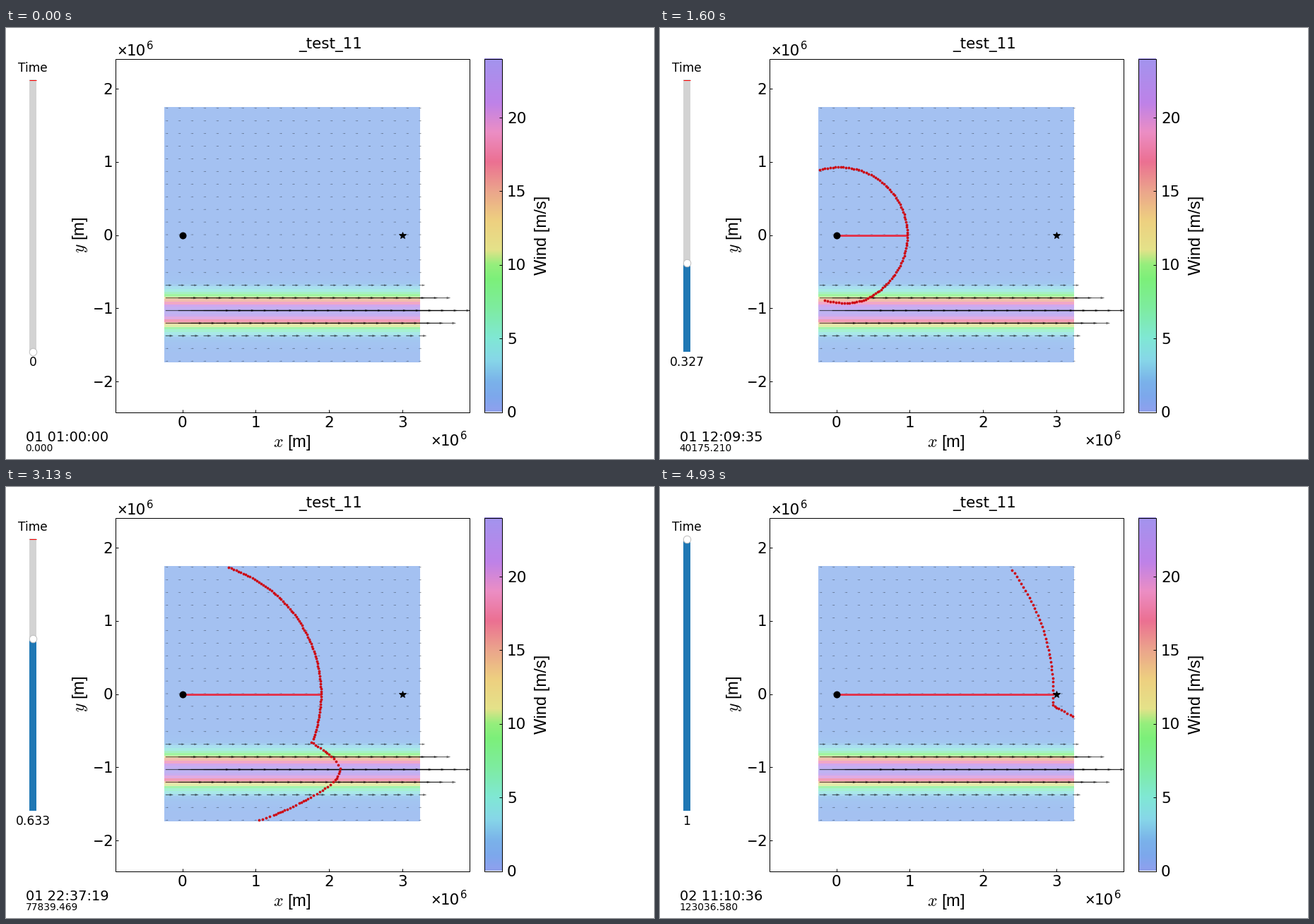
These frames come from a looping animation (917x611 px, 5060 ms). A matplotlib script:

```python
import math

import numpy as np
import matplotlib.pyplot as plt
from matplotlib.animation import FuncAnimation
from matplotlib.colors import LinearSegmentedColormap
from matplotlib.patches import Rectangle

plt.rcParams["mathtext.fontset"] = "cm"

WIDTH, HEIGHT, DPI = 917, 611, 64
PT = 72 / DPI                      # points per pixel
LOOP_MS, TICK_MS = 5060, 10
STEPS = 49

# Physics in units of 1e6 m and 1e6 s, so speeds stay in m/s
DURATION, SOLVER_STEP = 0.12303658, 0.00202
AIRSPEED, BASE_WIND, JET_WIND = 23.0, 1.0, 23.0
JET_Y, JET_SIGMA = -1.0417, 0.15
MAX_GAP = 0.06

# Pixel layout
ORIGIN_X, ORIGIN_Y, SCALE = 249.5, 293.5, 103.87
FIELD_LEFT, FIELD_TOP, FIELD_SIZE, CELLS = 224, 112, 362, 101
CELL = FIELD_SIZE / CELLS
LEFT, TOP, RIGHT, BOTTOM = 154.5, 43.5, 655.5, 544.5
BAR_LEFT, BAR_RIGHT, MAX_WIND = 676.5, 701.5, 24
TRACK_BOTTOM, TRACK_TOP = 458.5, 73.5


def to_px(x, y):
    return ORIGIN_X + SCALE * x, ORIGIN_Y - SCALE * y


def to_data(px, py):
    return (px - ORIGIN_X) / SCALE, (ORIGIN_Y - py) / SCALE


def cell_centers(start):
    return start + CELL * (np.arange(CELLS) + 0.5)


GRID_X, GRID_Y = cell_centers(FIELD_LEFT), cell_centers(FIELD_TOP)


def wind(y):
    return BASE_WIND + JET_WIND * np.exp(-((y - JET_Y) / JET_SIGMA) ** 2 / 2)


def flow(state):
    """Time-optimal rays (x, y, heading) in a wind that varies with y."""
    _, y, heading = state
    u = wind(y)
    shear = -(u - BASE_WIND) * (y - JET_Y) / JET_SIGMA ** 2
    return np.array([AIRSPEED * np.cos(heading) + u,
                     AIRSPEED * np.sin(heading),
                     -np.cos(heading) ** 2 * shear])


def advance(state, duration, substeps=4):
    h = duration / substeps
    for _ in range(substeps):
        k1 = flow(state)
        k2 = flow(state + h / 2 * k1)
        k3 = flow(state + h / 2 * k2)
        k4 = flow(state + h * k3)
        state = state + h / 6 * (k1 + 2 * k2 + 2 * k3 + k4)
    return state


def drop_outside(state):
    left, top = to_data(GRID_X[0], GRID_Y[0])
    right, bottom = to_data(GRID_X[-1], GRID_Y[-1])
    x, y, _ = state
    inside = (x > left) & (x < right) & (y > bottom) & (y < top)
    state[:, ~inside] = np.nan
    return state


def cut_overlap(state):
    """Remove the loop where the front crosses itself, leaving a short tip."""
    points = state[0] + 1j * state[1]
    offsets = points[None, :] - points[:-1, None]
    side = (np.conj(np.diff(points))[:, None] * offsets).imag
    splits = side[:, :-1] * side[:, 1:] < 0
    first, last = np.nonzero(np.triu(splits & splits.T, 2))
    if len(first) == 0:
        return state
    widest = np.argmax(last - first)
    return np.delete(state, np.s_[first[widest] + 2:last[widest] + 1], axis=1)


def refine(state):
    dx, dy, turn = np.diff(state, axis=1)
    split = (np.hypot(dx, dy) > MAX_GAP) & (np.abs(turn) < 0.5)
    middle = (state[:, 1:] + state[:, :-1]) / 2
    return np.insert(state, np.flatnonzero(split) + 1, middle[:, split], axis=1)


def compute_fronts():
    headings = np.linspace(-3.1, 3.1, 21)
    state = np.array([0 * headings, 0 * headings, headings])
    fronts = [to_px(*state[:2])]
    for _ in range(math.ceil(DURATION / SOLVER_STEP)):
        state = drop_outside(advance(state, SOLVER_STEP))
        state = refine(cut_overlap(state))
        fronts.append(to_px(*state[:2]))
    return fronts


with np.errstate(invalid="ignore"):
    FRONTS = compute_fronts()

WIND_STOPS = [(0, "#8fa0ee"), (1, "#7da8ec"), (2, "#7ab2ea"), (3.5, "#87d7e8"),
              (5, "#80e8d4"), (7, "#7eeca0"), (9, "#7cf07a"), (10, "#96ee7d"),
              (11, "#e4e28a"), (13, "#eed080"), (15, "#eba58c"), (17, "#eb7092"),
              (19, "#ec8ec4"), (21, "#be82e8"), (24, "#a394ee")]
cmap = LinearSegmentedColormap.from_list(
    "wind", [(v / MAX_WIND, c) for v, c in WIND_STOPS], N=256)

fig = plt.figure(figsize=(WIDTH / DPI, HEIGHT / DPI), dpi=DPI, facecolor="white")
ax = fig.add_axes([0, 0, 1, 1])
ax.axis("off")


def label(x, middle, text, size, ha="left", family="DejaVu Sans"):
    return ax.text(x, middle + 0.36 * size, text, size=size * PT, ha=ha,
                   va="baseline", family=family)


def axis_label(x, y, text, rotation=0):
    ax.text(x, y, text, size=23.7 * PT, ha="center", va="center",
            rotation=rotation, family="Liberation Sans")


def segment(xs, ys, color="black", width=1.0, **kwargs):
    return ax.plot(xs, ys, color=color, lw=width * PT,
                   solid_capstyle="butt", **kwargs)[0]


def box(x0, y0, x1, y1, **kwargs):
    return ax.add_patch(Rectangle((x0, y0), x1 - x0, y1 - y0, **kwargs))


def outline(*corners):
    return box(*corners, fill=False, ec="black", lw=1 * PT, zorder=6)


def marker(x, y, shape, size, **kwargs):
    return ax.plot([x], [y], shape, ms=size * PT, **kwargs)[0]


def power_label(x, middle):
    label(x, middle, "×", 23.5, family="Liberation Sans")
    label(x + 13.5, middle, "10", 21.5)
    label(x + 42, middle - 6, "6", 15)


def draw_field():
    speeds = wind(to_data(0, GRID_Y)[1])
    colors = 0.3 + 0.7 * cmap(speeds / MAX_WIND)[:, None, :3]
    ax.imshow(colors, extent=(FIELD_LEFT, FIELD_LEFT + FIELD_SIZE,
                              FIELD_TOP + FIELD_SIZE, FIELD_TOP),
              interpolation="nearest", aspect="auto", zorder=1)
    xs, ys = np.meshgrid(GRID_X[::5], GRID_Y[::5])
    us = np.repeat(speeds[::5, None], xs.shape[1], axis=1)
    arrows = ax.quiver(xs, ys, us, 0 * us, angles="xy", units="xy",
                       scale_units="xy", scale=1 / 3.8, width=1.2, minshaft=2,
                       color="black", alpha=0.6, zorder=2)
    arrows.set_clip_path(frame)


def draw_axes():
    for v in range(-2, 4):
        x, y = to_px(v, v)
        if v >= 0:
            segment([x, x], [BOTTOM - 4, BOTTOM], zorder=6)
            label(x, 558, str(v), 21.5, "center")
        if v <= 2:
            segment([LEFT, LEFT + 4], [y, y], zorder=6)
            label(151.5, y, str(abs(v)), 21.5, "right")
        if v < 0:
            label(137.5, y, "−", 23.5, "right", "Liberation Sans")
    power_label(157, 31)
    power_label(601, 584)
    axis_label(405, 588, "$x$ [m]")
    axis_label(104.5, 293.5, "$y$ [m]", 90)
    label(459, 21, "_test_11", 21.5, "center")


def draw_colorbar():
    ramp = cmap(np.linspace(1, 0, 256))[:, None, :3]
    ax.imshow(ramp, extent=(BAR_LEFT, BAR_RIGHT, BOTTOM, TOP),
              aspect="auto", zorder=1)
    outline(BAR_LEFT, TOP, BAR_RIGHT, BOTTOM)
    for v in range(0, 21, 5):
        y = BOTTOM - v / MAX_WIND * (BOTTOM - TOP)
        segment([BAR_RIGHT - 4, BAR_RIGHT], [y, y], zorder=6)
        label(709, y, str(v), 21.5)
    axis_label(758.5, 294, "Wind [m/s]", 90)


frame = outline(LEFT, TOP, RIGHT, BOTTOM)
draw_field()
draw_axes()
draw_colorbar()

route = segment([], [], color="#e0364f", width=3, zorder=3)
front = ax.plot([], [], "o", ms=3.8 * PT, color="#cc0a14", mew=0, zorder=4)[0]
marker(*to_px(0, 0), "o", 10, color="black", mew=0, zorder=5)
marker(*to_px(3, 0), "*", 11, color="black", zorder=5)

label(38, 56, "Time", 17, "center")
box(33, 73, 43, TRACK_BOTTOM, fc="lightgray", lw=0)
segment([33, 43], [TRACK_TOP, TRACK_TOP], color="red", zorder=2)
fill = box(33, TRACK_BOTTOM, 43, TRACK_BOTTOM, fc="#1f77b4", lw=0, zorder=3)
handle = marker(38, TRACK_BOTTOM, "o", 10.5, mfc="white", mec="0.75", mew=1 * PT, zorder=7)
value_text = label(38, 473, "", 17.1, "center")
clock_text = label(27.5, 579.5, "", 19.4)
seconds_text = label(27.5, 595.5, "", 13.7)

ax.set(xlim=(0, WIDTH), ylim=(HEIGHT, 0))


def format_value(value):
    digits = next(d for d in range(4) if abs(value - round(value, d)) < 1e-3)
    return f"{value:.{digits}f}"


def format_clock(seconds):
    total = int(seconds) + 3600
    days, rest = divmod(total, 86400)
    return f"{days + 1:02d} {rest // 3600:02d}:{rest // 60 % 60:02d}:{rest % 60:02d}"


def step_at(ms):
    """Steps alternate between 130 ms and 70 ms."""
    return min(2 * (ms // 200) + (ms % 200 >= 130), STEPS)


def update(tick):
    value = step_at(tick * TICK_MS) / STEPS
    time = value * DURATION

    # The front and route show the first solver state not before this time
    solved = math.ceil(time / SOLVER_STEP)
    front.set_data(*FRONTS[solved])
    end_x, y = to_px((AIRSPEED + BASE_WIND) * solved * SOLVER_STEP, 0)
    route.set_data([ORIGIN_X, end_x], [y, y])

    level = TRACK_BOTTOM - value * (TRACK_BOTTOM - TRACK_TOP)
    fill.set_y(level)
    fill.set_height(TRACK_BOTTOM - level)
    handle.set_data([38], [level])
    value_text.set_text(format_value(value))
    clock_text.set_text(format_clock(time * 1e6))
    seconds_text.set_text(f"{time * 1e6:.3f}")
    return front, route, fill, handle, value_text, clock_text, seconds_text


animation = FuncAnimation(fig, update, frames=LOOP_MS // TICK_MS,
                          interval=TICK_MS, repeat=True)
plt.show()
```
